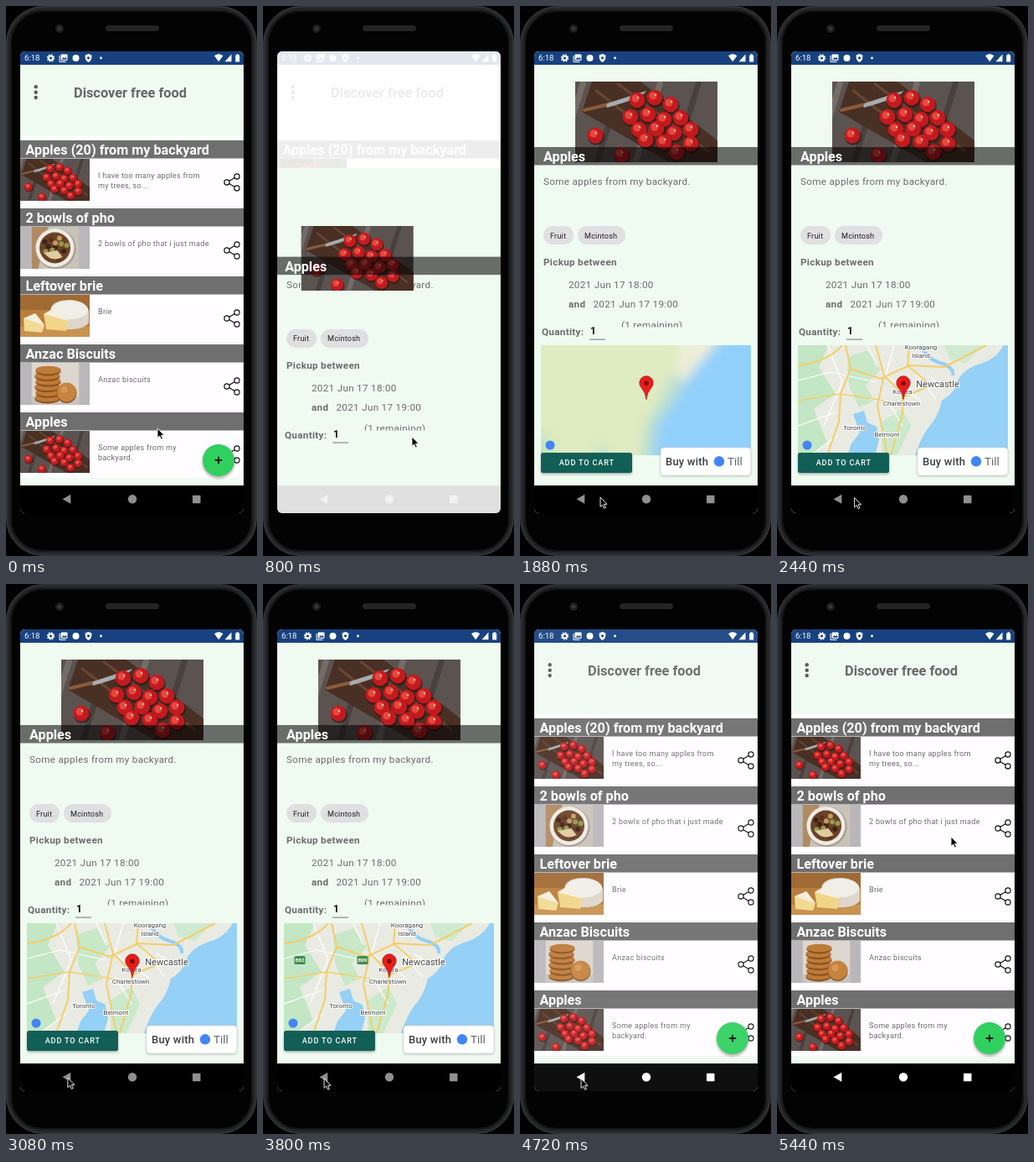
An HTML page that plays this animation: 300x655 px, repeating every 5480 ms.

```html
<!DOCTYPE html>
<html lang="en">
<head>
<meta charset="utf-8">
<title>Free food app</title>
<style>
  html, body { margin: 0; width: 300px; height: 655px; overflow: hidden; background: #000; }
  svg { display: block; font-family: Roboto, "Open Sans", sans-serif; }
</style>
</head>
<body>
<svg id="stage" width="300" height="655" viewBox="0 0 300 655"></svg>
<script>
const LOOP = 5480, STEP = 40;
const MINT = '#effaf1', GREY = '#6c6c6c', BAR = 'fill="#000" fill-opacity=".56"';

// ---- markup helpers ----
const rect = (x, y, w, h, fill, extra = '') =>
  `<rect x="${x}" y="${y}" width="${w}" height="${h}" fill="${fill}" ${extra}/>`;
const dot = (x, y, r, fill, extra = '') =>
  `<circle cx="${x}" cy="${y}" r="${r}" fill="${fill}" ${extra}/>`;
const path = (d, fill, extra = '') => `<path d="${d}" fill="${fill}" ${extra}/>`;
const line = (d, color, width, extra = '') =>
  path(d, 'none', `stroke="${color}" stroke-width="${width}" ${extra}`);
const text = (x, y, s, size, fill, weight = 400, gap = 0, extra = '') =>
  `<text x="${x}" y="${y}" font-size="${size}" fill="${fill}" font-weight="${weight}" letter-spacing="${gap}" ${extra}>${s}</text>`;
const group = (id, body, extra = '') => `<g id="${id}" ${extra}>${body}</g>`;
const use = (id, x, y, w, h, extra = '') =>
  `<use href="#${id}" x="${x}" y="${y}" width="${w}" height="${h}" ${extra}/>`;
const symbol = (id, w, h, body) =>
  `<symbol id="${id}" viewBox="0 0 ${w} ${h}" preserveAspectRatio="xMidYMid slice">${body}</symbol>`;
const clip = (id, x, y, w, h, r = 0) =>
  `<clipPath id="${id}">${rect(x, y, w, h, '#000', `rx="${r}"`)}</clipPath>`;

// ---- pictures ----
function applePhoto() {
  const apples = [[74, 22], [95, 19], [114, 27], [66, 42], [87, 39], [106, 45], [126, 43], [76, 57],
    [97, 56], [118, 61], [138, 57], [84, 69], [106, 72], [138, 74], [24, 64], [55, 87], [121, 84]];
  let s = rect(0, 0, 170, 96, '#5b5350');
  for (let i = 0; i < 5; i++)
    s += line(`M${-20 + i * 46} 96L${10 + i * 46} 0`, i % 2 ? '#48413f' : '#756c68', 7);
  s += path('M20 0H78L170 70V96H112L8 36Z', '#493024');
  s += line('M24 10L130 92M50 2L160 84', '#6a4632', 3);
  s += path('M35 27L85 11Q82 19 38 31Z', '#a7abb0');
  s += line('M11 34L36 28', '#8b5c3c', 4, 'stroke-linecap="round"');
  for (const [x, y] of apples)
    s += dot(x + 1, y + 2, 10, '#2a1512', 'opacity=".6"') + dot(x, y, 9.3, '#c31a20') +
      dot(x - 2, y - 2, 4.5, '#e5483f') + dot(x + 1, y - 3, 1.2, '#f3c39b');
  return symbol('apples', 170, 96, s);
}

function phoPhoto() {
  let s = rect(0, 0, 57, 50, '#c9c2b8') + path('M0 0H20L8 50H0Z', '#b28a62') +
    dot(29, 26, 24, '#a59c92') + dot(28, 25, 23, '#eeebe4') + dot(28, 25, 18.5, '#6b4226');
  for (let i = 0; i < 14; i++) {
    const a = i * 2.4, r = 4 * Math.sqrt(i);
    s += dot(28 + r * Math.cos(a), 25 + r * Math.sin(a), 3, ['#3d2218', '#8f9b4a', '#c59a62', '#59301f'][i % 4]);
  }
  return symbol('pho', 57, 50, s + path('M15 31Q24 43 37 36L31 28Z', '#e0caa0'));
}

const briePhoto = () => symbol('brie', 83, 50,
  rect(0, 0, 83, 50, '#b97e3c') + rect(0, 0, 83, 18, '#a06a34') +
  path('M0 38H83V50H0Z', '#c9924f') +
  path('M36 17Q40 5 62 6Q80 8 82 20V33Q76 42 55 41Z', '#dcd6cc') +
  '<ellipse cx="59" cy="18" rx="22" ry="11" fill="#f1eee8"/>' +
  path('M28 23L42 15L58 31L55 43L31 41Z', '#f0d589') + path('M28 23L42 15L58 31Z', '#f5efe2') +
  path('M4 28L18 22L29 36L26 45L5 43Z', '#f2da95') + path('M4 28L18 22L29 36Z', '#f6efdf'));

function biscuitPhoto() {
  let s = rect(0, 0, 57, 50, '#ddd6ce') + rect(0, 40, 57, 10, '#c8c3bd');
  for (let i = 0; i < 6; i++)
    s += `<ellipse cx="${19 + i % 2}" cy="${43 - i * 6.6}" rx="15" ry="5.4" fill="#8a5020"/>` +
      `<ellipse cx="${19 + i % 2}" cy="${41.5 - i * 6.6}" rx="15" ry="4.8" fill="#bd7b38"/>`;
  return symbol('biscuits', 57, 50, s + dot(42, 36, 12, '#8f5525') + dot(42, 35, 11.4, '#c58440') +
    dot(39, 32, 4, '#d69a58'));
}

// ---- phone ----
const phone = () =>
  rect(0, 0, 300, 655, '#000') +
  rect(2.5, 2.5, 295, 650, '#030303', 'rx="42" stroke="#252628" stroke-width="5"') +
  rect(1, 1, 298, 653, 'none', 'rx="43" stroke="#3d3e40" stroke-width="1"') +
  rect(6, 6, 288, 643, 'none', 'rx="38" stroke="#151617" stroke-width="2"') +
  dot(64, 27, 5, '#1d1e20') + dot(64, 27, 2.4, '#35373a') +
  rect(119, 23, 64, 7, '#232426', 'rx="3.5"');

function statusBar() {
  const w = '#fff';
  return rect(17, 54, 267, 16, '#17427f') + text(22, 65.4, '6:18', 9.6, w) +
    dot(53.5, 62, 2.6, 'none', `stroke="${w}" stroke-width="2"`) +
    dot(53.5, 62, 4, 'none', `stroke="${w}" stroke-width="1.5" stroke-dasharray="1.6 1.54"`) +
    line('M64 59V66.5H71.5', w, 1) + rect(65.5, 57.5, 8, 7.5, w, 'rx="1"') +
    path('M66.5 63.8L68.6 61L70 62.6L71.3 60.8L73 63.8Z', '#17427f') +
    dot(83.5, 62, 4, w) +
    path('M98.5 57L102.3 58.5V61.5Q102 65 98.5 67Q95 65 94.7 61.5V58.5Z', w) +
    dot(98.5, 61.8, 1.6, '#17427f') + dot(113.5, 62, 1.4, w) +
    path('M249 59.3Q254.2 55.2 259.4 59.3L254.2 66.3Z', w) +
    path('M261.5 66.3H269.5V57.6Z', w) +
    path('M274.2 58.4H275.6V57.3H277.8V58.4H279.2V66.6H274.2Z', w);
}

const navBar = cls => rect(17, 571, 267, 33, '#000') +
  `<g class="${cls}" fill="#8f8f8f"><path d="M67.5 587.3L77.3 581.8V592.8Z"/>` +
  '<circle cx="151" cy="587.3" r="5.2"/><rect x="223" y="582.8" width="9.5" height="9.5" rx=".8"/></g>';

// ---- list screen ----
const rows = [
  ['Apples (20) from my backyard', 'apples', 'I have too many apples from', 'my trees, so...'],
  ['2 bowls of pho', 'pho', '2 bowls of pho that i just made'],
  ['Leftover brie', 'brie', 'Brie'],
  ['Anzac Biscuits', 'biscuits', 'Anzac biscuits'],
  ['Apples', 'apples', 'Some apples from my', 'backyard.']
];

function row([title, pic, ...desc], i) {
  const y = 160 + 81 * i, narrow = pic === 'pho' || pic === 'biscuits';
  const head = rect(17, y, 267, 21.5, '#000', 'fill-opacity=".56"') + text(23.5, y + 17, title, 16.2, '#fff', 700);
  const thumb = (narrow ? rect(17, y + 22, 83, 50, '#b9b7ba') : '') +
    use(pic, narrow ? 30.5 : 17, y + 22, narrow ? 57 : 83, 50);
  return rect(17, y, 267, 78, '#fffdff') + (i < 4 ? rect(17, y + 78, 267, 3, '#fafafa') : '') +
    group('row' + i, head + thumb) +
    desc.map((s, k) => text(110, y + 45.3 + 11.6 * k, s, 9.1, GREY, 400, .27)).join('') +
    line(`M276 ${y + 43}L264 ${y + 50}L276 ${y + 57}`, '#111', 1.2) +
    [[276, 43], [264, 50], [276, 57]].map(([x, d]) =>
      dot(x, y + d, 3.1, '#fff', 'stroke="#111" stroke-width="1.2"')).join('');
}

const home = () => rect(17, 54, 267, 550, '#fff') + statusBar() +
  rect(17, 70, 267, 85, MINT) + rect(17, 562, 267, 9, MINT) +
  [96.3, 102.7, 109].map(y => dot(35.7, y, 2.2, '#5a5a5a')).join('') +
  text(81, 109.2, 'Discover free food', 16.35, '#676767', 700) +
  rows.map(row).join('') +
  dot(254, 543, 19.5, '#000', 'opacity=".3" filter="url(#soft)"') + dot(254, 541, 19, '#30d05f') +
  line('M249.8 541H258.2M254 536.8V545.2', '#111', 1.8) + navBar('nav');

// ---- detail screen ----
function streetMap() {
  const road = (d, w = 2) => line(d, '#f4cd6a', w);
  const minor = d => line(d, '#fff', 1.2);
  const halo = 'stroke="#fff" stroke-width="2" paint-order="stroke" text-anchor="middle"';
  const label = (x, y, s, size = 8) => text(x, y, s, size, '#444', 400, 0, halo);
  const sign = (x, s) => rect(x - 6.5, 443, 13, 10, '#3f8f4c', 'rx="1.5"') +
    text(x, 450.3, s, 6, '#fff', 700, 0, 'text-anchor="middle"');
  return rect(25, 404, 251, 131, '#e9ebe2') +
    path('M25 404H62L50 430L70 462L44 480L60 520L42 535H25Z', '#c3e6c4') +
    path('M84 418L108 410L124 432L106 452L116 470L98 478L86 452Z', '#c8e8c8') +
    path('M124 496L150 480L160 500L144 535H126Z', '#cbe9cb') +
    path('M200 404H246L226 426L206 420Z', '#cfead0') +
    path('M276 404H271Q262 421 240 427Q218 435 214 452Q209 463 197 470Q193 489 181 502Q172 514 165 535H276Z', '#95d0f6') +
    path('M91 486L104 482L108 496L119 501L122 517L117 535H84L89 521L99 508Z', '#95d0f6') +
    line('M172 404Q178 420 195 425T210 440', '#95d0f6', 4) +
    minor('M25 446L64 436L120 448M60 404L78 448L56 500M140 404L130 440L172 470M150 500L132 470L110 468M180 440L198 452M25 500L70 484M160 430L190 468M108 404L120 430M40 535L72 512') +
    road('M25 428Q60 424 78 404') + road('M82 404L88 432L76 462L74 495L60 535') +
    road('M88 432L124 444L158 428L200 430') + road('M118 404L128 440L120 476L132 535') +
    road('M128 440L150 462L150 486L136 535') + road('M158 404L156 428L184 452L150 466') +
    road('M25 470L76 462L128 470', 1.5) + road('M200 430L250 404') +
    label(172, 409.3, 'Kooragang') + label(172, 419, 'Island') +
    label(192, 453.8, 'Newcastle', 11) + label(150, 461.5, 'Kotara') +
    label(149, 475.8, 'Charlestown') + label(93, 504.5, 'Toronto') + label(131.5, 513.4, 'Belmont') +
    group('signs', sign(44, 'B82') + sign(119, 'B89'));
}

const roughMap = () => rect(25, 404, 251, 131, '#dfebc0') +
  '<g filter="url(#blur)">' +
  path('M196 390H300V550H146L150 500L168 470L186 430Z', '#b8dfd4') +
  path('M190 390H240L212 440L186 446Z', '#eeeed6') +
  path('M246 390H300V550H158L164 498L186 470L206 436Z', '#92d0fc') +
  path('M10 500L40 515L36 550H10Z', '#c6e6bd') + path('M84 550L96 522L116 550Z', '#b9dfd2') + '</g>';

const pin = () =>
  path('M151 468.5Q150 460 145 454.5A8.2 8.2 0 1 1 157 454.5Q152 460 151 468.5Z', '#ea1c1c', 'stroke="#a01212" stroke-width=".7"') +
  dot(151, 449.3, 2.8, '#7c0d0d');

function panel() {
  const info = (x, y, s, weight = 400) => text(x, y, s, 11.7, GREY, weight, .3);
  const chip = (x, w, s) => rect(x, 262, w, 22, '#e0dfe2', 'rx="11"') + text(x + 8, 276.5, s, 9.1, '#222', 400, .2);
  return rect(17, 70, 267, 501, MINT) +
    info(28, 213.4, 'Some apples from my backyard.') + chip(28, 36, 'Fruit') + chip(69, 57, 'Mcintosh') +
    info(28, 308.8, 'Pickup between', 700) + info(58, 336.2, '2021 Jun 17 18:00') +
    info(58, 358.8, 'and', 700) + info(87.5, 358.8, '2021 Jun 17 19:00') +
    `<g clip-path="url(#cut)">${info(121, 383.6, '(1 remaining)')}</g>` +
    info(26, 391.8, 'Quantity:', 700) + text(84, 390.8, '1', 12, '#111', 700) + rect(83, 396.6, 19, 1, '#777') +
    group('map', roughMap() + group('streets', streetMap()) + pin() + dot(36, 523, 5.5, '#4285f4'),
      'clip-path="url(#mapBox)"') +
    rect(25, 533.5, 109, 24, '#000', 'rx="2.5" opacity=".3" filter="url(#soft)"') +
    rect(25, 532, 109, 24, '#115f57', 'rx="2.5"') +
    text(79.8, 547.3, 'ADD TO CART', 9.1, '#fff', 500, .85, 'text-anchor="middle"') +
    rect(168, 527, 108, 33, '#000', 'rx="4" opacity=".25" filter="url(#soft)"') +
    rect(168, 526, 108, 33, '#fff', 'rx="4" stroke="#dadce0" stroke-width=".8"') +
    text(174, 547, 'Buy with', 13, '#3c4043', 500, .2) + dot(238, 542.3, 6.2, '#4285f4') +
    text(248, 547, 'Till', 13.5, '#5f6368');
}

const svg = document.getElementById('stage');
svg.innerHTML = '<defs>' + applePhoto() + phoPhoto() + briePhoto() + biscuitPhoto() +
  clip('screen', 17, 54, 267, 550, 6) + clip('body', 17, 70, 267, 501) +
  clip('cut', 110, 370, 100, 12.6) + clip('mapBox', 25, 404, 251, 131) +
  '<filter id="soft" x="-30%" y="-30%" width="160%" height="160%"><feGaussianBlur stdDeviation="1.6"/></filter>' +
  '<filter id="blur"><feGaussianBlur stdDeviation="7"/></filter></defs>' + phone() +
  '<g clip-path="url(#screen)">' + group('home', home()) +
  group('veil', rect(17, 54, 267, 550, '#fff')) +
  `<g clip-path="url(#body)">${group('panel', panel())}</g>` +
  group('chrome', statusBar() + navBar('nav')) +
  group('hero', use('apples', 0, 0, 1, 1, 'id="photo"') +
    group('caption', `<rect x="17" width="267" height="21.5" ${BAR}/>` +
      text(23.5, 17, 'Apples', 16.2, '#fff', 700, 0, 'id="name"'))) + '</g>' +
  group('cursor', path('M0 0V11.4L2.6 9L4.5 13.2L6.4 12.3L4.5 8.3H8Z', '#000', 'stroke="#fff" stroke-width=".9"'));

const el = Object.fromEntries([...svg.querySelectorAll('[id]')].map(n => [n.id, n]));
const icons = svg.querySelectorAll('.nav');

// ---- motion ----
const OPEN = 680, CLOSE = 4368, FLIGHT = 310;
const pointer = [[0, 181, 503], [120, 181, 503], [480, 178, 513], [1240, 178, 513], [1840, 96, 585],
  [2320, 96, 585], [2800, 74, 588], [4000, 73, 589], [4960, 73, 589], [5400, 208, 301], [5480, 208, 301]];

const clamp = v => Math.max(0, Math.min(1, v));
const mix = (a, b, p) => a + (b - a) * p;
const smooth = p => p * p * (3 - 2 * p);
const show = (node, on) => node.setAttribute('visibility', on ? 'visible' : 'hidden');
const move = (node, x, y) => node.setAttribute('transform', `translate(${x} ${y})`);

// cubic-bezier(.4, 0, .2, 1)
function ease(x) {
  let lo = 0, hi = 1;
  for (let i = 0; i < 24; i++) {
    const s = (lo + hi) / 2, r = 1 - s;
    if (1.2 * s * r * r + .6 * s * s * r + s * s * s < x) lo = s; else hi = s;
  }
  return lo * lo * (3 - 2 * lo);
}

function pointerAt(t) {
  const i = Math.max(1, pointer.findIndex(k => k[0] >= t));
  const [t0, x0, y0] = pointer[i - 1], [t1, x1, y1] = pointer[i];
  const p = smooth(clamp((t - t0) / (t1 - t0)));
  return [mix(x0, x1, p), mix(y0, y1, p)];
}

function render(t) {
  const enter = clamp((t - OPEN) / FLIGHT), leave = clamp((t - CLOSE) / FLIGHT);
  const shown = enter > 0 && leave < 1, steady = enter === 1 && leave === 0;
  const p = leave > 0 ? 1 - ease(leave) : ease(enter);

  const slide = leave > 0 ? Math.pow(leave, 1.07) : Math.pow(1 - enter, 2.87);
  move(el.panel, 0, 501 * slide);
  show(el.panel, shown);
  show(el.chrome, steady);
  el.veil.setAttribute('opacity', t < CLOSE ? clamp(enter * 2.27) : 1 - clamp((t - 4390) / 350));

  show(el.hero, shown);
  show(el.row4, !shown);
  const box = { x: mix(17, 66, p), y: mix(506, 90, p), width: mix(83, 170, p), height: mix(50, 96, p) };
  for (const k in box) el.photo.setAttribute(k, box[k]);
  move(el.caption, 0, mix(484, 168, p));
  el.name.setAttribute('x', mix(23.5, 28, p));

  el.map.setAttribute('display', t >= 1240 ? 'inline' : 'none');
  el.streets.setAttribute('opacity', clamp((t - 2300) / 120));
  el.signs.setAttribute('display', t >= 3320 ? 'inline' : 'none');
  icons.forEach(n => n.setAttribute('fill', t < CLOSE ? '#8f8f8f' : '#fff'));
  move(el.cursor, ...pointerAt(t));
}

const start = performance.now();
function tick() {
  const t = (performance.now() - start) % LOOP;
  render(Math.floor(t / STEP) * STEP);
  requestAnimationFrame(tick);
}
tick();
</script>
</body>
</html>
```
